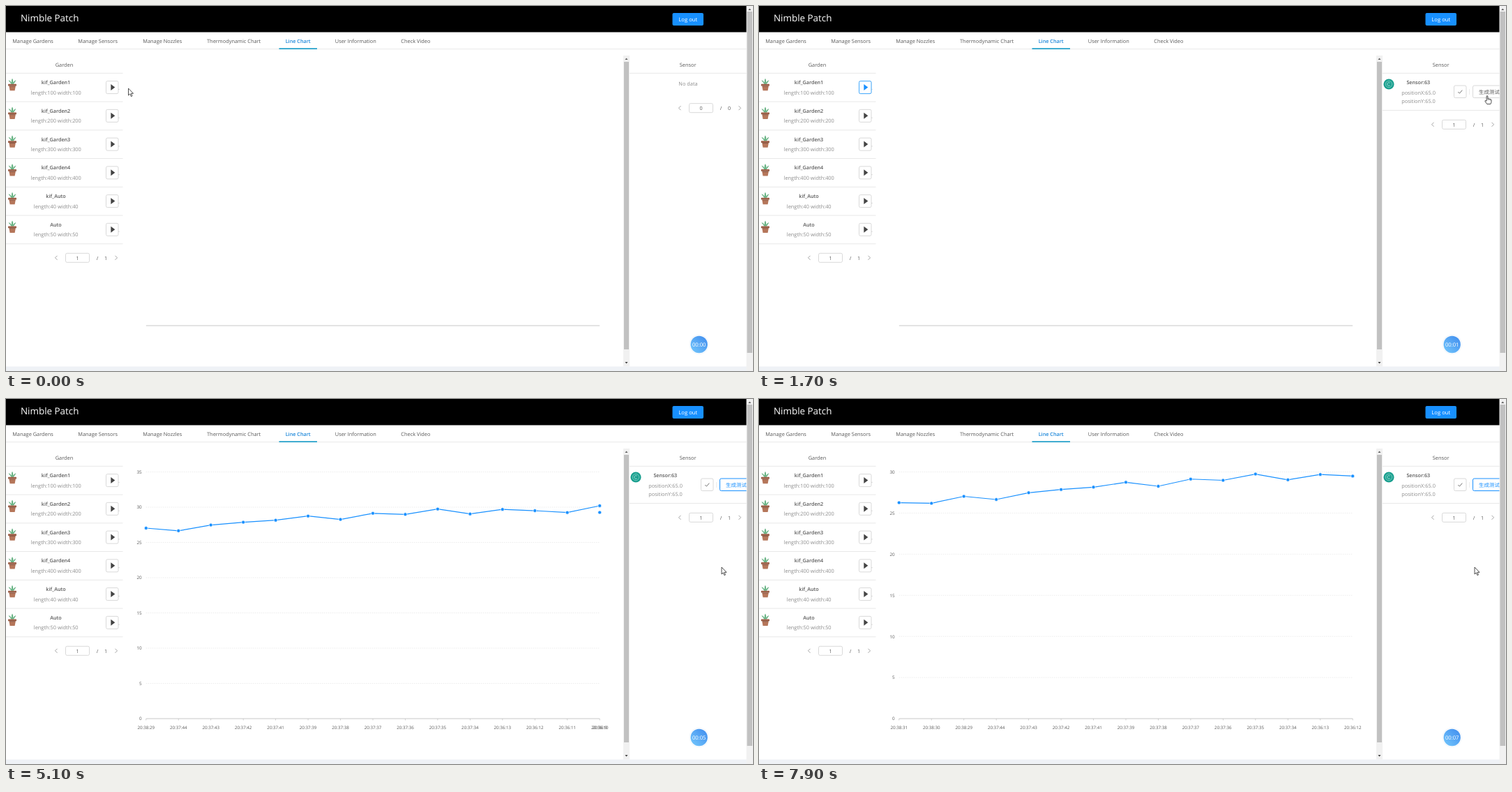
Animation, 1071 px wide and 523 px high, one loop 8000 ms. Source, as an HTML page:

```html
<!DOCTYPE html>
<html lang="en">
<head>
<meta charset="utf-8">
<title>Garden dashboard</title>
<style>
  html, body { margin: 0; width: 100%; height: 100%; overflow: hidden; background: #fff; }
  svg { display: block; }
  text { font-family: "Open Sans", "Noto Sans", "Noto Sans CJK SC", "Noto Sans CJK", sans-serif; text-rendering: geometricPrecision; }
</style>
</head>
<body>
<svg width="1071" height="523" viewBox="0 0 1071 523">
  <defs>
    <linearGradient id="badge" x1="0" y1="1" x2="1" y2="0">
      <stop offset="0" stop-color="#74c8fc"/><stop offset="1" stop-color="#3f8bee"/>
    </linearGradient>
    <clipPath id="reveal"><rect id="revealBox" x="195" y="95" width="0" height="370"/></clipPath>
  </defs>
  <g id="page"></g>
  <g id="live"></g>
  <g id="frame"></g>
  <g id="cursor"></g>
</svg>
<script>
const LOOP = 8000;
const BLUE = '#1890ff', GREY = '#d9d9d9', INK = '#595959', SOFT = '#8c8c8c';
const $ = id => document.getElementById(id);
const mix = (a, b, p) => a + (b - a) * p;
const clamp = p => Math.max(0, Math.min(1, p));
const ease = p => (p = clamp(p)) < .5 ? 2 * p * p : 1 - 2 * (1 - p) * (1 - p);

// Drawing helpers
const text = (x, y, str, size = 7.4, fill = INK, anchor = 'middle', weight = 400, opacity = 1) =>
  `<text x="${x}" y="${y}" font-size="${size}" fill="${fill}" text-anchor="${anchor}" font-weight="${weight}" opacity="${opacity}">${str}</text>`;
const rect = (x, y, w, h, fill, extra = '') =>
  `<rect x="${x}" y="${y}" width="${w}" height="${h}" fill="${fill}" ${extra}/>`;
const box = (x, y, w, h, stroke = GREY) => rect(x, y, w, h, '#fff', `rx="2" stroke="${stroke}"`);
const path = (d, fill = 'none', stroke = 'none', width = 1, extra = '') =>
  `<path d="${d}" fill="${fill}" stroke="${stroke}" stroke-width="${width}" ${extra}/>`;
const rule = (x, y, w, color = '#e8e8e8') => rect(x, y - .5, w, 1, color);
const group = (x, y, body) => `<g transform="translate(${x} ${y})">${body}</g>`;

const plant = path('M4.6 8C3 5 1.2 4 .8 2.5Q3.5 3 5 6Q4.8 2 6.2 0Q7.8 2 7.5 6Q9 3 11.6 2.5Q10.5 5 8 8Z', '#5aa878')
  + path('M6.2 1V8M2.5 4L5 8M10 4L7.4 8', 'none', '#8fd0a5', .6)
  + path('M1.6 11H11L9.8 17.5H2.8Z', '#b5765a') + rect(.2, 8, 12, 2.8, '#9c6048', 'rx=".6"')
  + rect(2, 10.8, 8.6, .8, '#7d4a38');

const playButton = (y, border = GREY, fill = '#444') =>
  box(143.5, y - 9, 17.5, 18, border) + path(`M150.3 ${y - 4.5}L156.3 ${y}L150.3 ${y + 4.5}Z`, fill);

const pager = (x, y, page) => group(x, y,
  path('M3.5 -3L.5 0L3.5 3M86.5 -3L89.5 0L86.5 3', 'none', SOFT, .8)
  + box(15.5, -6.5, 34, 13) + text(32.5, 2.8, page, 7.2)
  + text(61, 2.8, '/', 7.2) + text(73, 2.8, page, 7.2));

const scrollbar = (x, y, w, h, thumbTop, thumbH) => {
  const c = x + w / 2;
  return rect(x, y, w, h, '#f1f1f1') + rect(x + 1, thumbTop, w - 2, thumbH, '#c1c1c1')
    + path(`M${c - 2} ${y + 6}h4l-2 -2.5Z`, '#606060');
};

// Fixed parts of the page
const tabs = [[38.5, 'Manage Gardens'], [131.7, 'Manage Sensors'], [224.2, 'Manage Nozzles'],
  [326.6, 'Thermodynamic Chart'], [501.3, 'User Information'], [587.4, 'Check Video']];
const gardens = [['kif_Garden1', 100], ['kif_Garden2', 200], ['kif_Garden3', 300],
  ['kif_Garden4', 400], ['kif_Auto', 40], ['Auto', 50]];
const rowY = i => 96.3 + 40.75 * i;

$('page').innerHTML = rect(0, 0, 1071, 523, '#fff') + rect(0, 0, 1062, 37.5, '#000')
  + text(21, 21.5, 'Nimble Patch', 13.4, '#fff', 'start')
  + rect(955.5, 10, 44.5, 18, BLUE, 'rx="2"') + text(977.8, 21.8, 'Log out', 7.7, '#fff')
  + rule(0, 61.7, 1062) + rect(391.5, 60.4, 54.5, 1.6, '#1399c6')
  + tabs.map(([x, label]) => text(x, 52.9, label)).join('')
  + text(418.7, 52.9, 'Line Chart', 7.25, '#1a86d9', 'middle', 600)
  + text(83.5, 86.6, 'Garden') + text(977.7, 86.6, 'Sensor')
  + rule(0, 96.3, 167.5) + rule(894, 96.3, 168)
  + gardens.map(([name, size], i) => {
      const y = rowY(i);
      return group(2.8, y + 7.5, plant)
        + text(71.5, y + 15.8, name, 7.2, INK, 'middle', 600)
        + text(71.7, y + 30.4, `length:${size} width:${size}`, 7.4, SOFT)
        + playButton(y + 20.3) + rect(161.4, y + 22.6, 1, 1, '#bbb') + rule(0, y + 40.75, 167.5);
    }).join('')
  + pager(70, 360.8, 1)
  + rule(200.8, 458, 650.4, '#c8c8c8');

$('frame').innerHTML = scrollbar(885, 71, 9, 445.5, 80, 412) + path('M887.5 510h4l-2 2.5Z', '#404040')
  + rect(0, 516.5, 1062, 6.5, '#eff2f6') + scrollbar(1061.5, 0, 9.5, 523, 8, 489);

// Chart: readings from newest to oldest
const readings = [['38:31', 26.26], ['38:30', 26.19], ['38:29', 27.03], ['37:44', 26.65], ['37:43', 27.47],
  ['37:42', 27.86], ['37:41', 28.15], ['37:39', 28.74], ['37:38', 28.26], ['37:37', 29.13], ['37:36', 28.98],
  ['37:35', 29.74], ['37:34', 29.04], ['36:13', 29.69], ['36:12', 29.5], ['36:11', 29.24], ['36:10', 30.2], ['36:9', 29.25]];
const SHOWN = 15, CHART_START = 2050, MORPH = 450;
const updates = [4550, 5550, 6550], CLEANUP = 7500;
const scaleMax = [35, 35, 30, 30];
const xAt = i => 200.8 + 46.457 * i;
const yAt = (v, max) => 458 - v * 353.5 / max;

const dot = (x, y, p = 1) => `<circle cx="${x}" cy="${y}" r="${2.5 * p}" fill="${BLUE}" stroke="#fff" stroke-width=".7"/>`;
const timeLabel = (x, j, opacity = 1) => text(x, 472.6, '20:' + readings[j][0], 6.2, INK, 'middle', 400, opacity);
const valueLabel = (y, v) => text(194.6, y + 2.4, v, 6.3, INK, 'end');

function chart(t) {
  const k = updates.filter(u => u <= t).length;
  const start = 3 - k, before = k ? start + 1 : start;
  const max = scaleMax[k], maxBefore = scaleMax[Math.max(0, k - 1)];
  const p = k ? ease((t - updates[k - 1]) / MORPH) : 1;
  const shown = ease((t - CHART_START) / MORPH);
  const y = v => mix(yAt(v, maxBefore), yAt(v, max), p);
  $('revealBox').setAttribute('width', 665 * shown);

  let grid = '', labels = '', dots = '', line = '';
  for (let v = 0; v <= max; v += 5) {
    if (v) grid += path(`M200.8 ${y(v)}H851.2`, 'none', '#e8e8e8', .8, 'stroke-dasharray="1.5 1.5"');
    labels += valueLabel(y(v), v);
  }
  for (let i = 0; i < SHOWN; i++) {
    const j = start + i, entering = j < before;
    const x = mix(xAt(Math.max(0, j - before)), xAt(i), p);
    const from = yAt(readings[before + i][1], maxBefore), to = yAt(readings[j][1], max);
    grid += rect(xAt(i) - .4, 458, .8, 2.5, '#c8c8c8');
    line += `${i ? 'L' : 'M'}${xAt(i)} ${mix(from, to, p)}`;
    labels += timeLabel(x, j, entering ? p : 1);
    dots += dot(x, y(readings[j][1]), entering ? p : shown);
  }
  // Items that left the window linger until the next refresh
  if (k && t < CLEANUP) {
    const gone = before + SHOWN - 1;
    labels += timeLabel(xAt(SHOWN - 1), gone);
    dots += dot(xAt(SHOWN - 1), yAt(readings[gone][1], maxBefore));
    if (max < maxBefore) labels += valueLabel(yAt(maxBefore, maxBefore), maxBefore);
  }
  return grid + labels + `<g clip-path="url(#reveal)">${path(line, 'none', BLUE, 1.2)}</g>` + dots;
}

const SENSOR_AT = 950, CHECK_AT = 1950, TEST_AT = 2900;

function sensorPanel(t) {
  if (t < SENSOR_AT) return text(978, 114.4, 'No data', 7.4, SOFT) + pager(964, 146.2, 0);
  const testColor = t >= TEST_AT ? BLUE : null;
  const checkColor = t >= CHECK_AT && t < TEST_AT ? BLUE : null;
  return `<circle cx="903" cy="112" r="7.6" fill="#1a9f8f"/><circle cx="903" cy="112" r="4.7" fill="none" stroke="#8fd6c9" stroke-width=".8"/>`
    + path('M904.8 110.5A2.3 2.3 0 1 0 904.8 113.5', 'none', '#a9e2d8', .9)
    + text(945.3, 112.1, 'Sensor:63', 7.2, INK, 'middle', 600)
    + text(945.5, 126.7, 'positionX:65.0', 7.4, SOFT) + text(945.5, 138.7, 'positionY:65.0', 7.4, SOFT)
    + box(996.5, 114, 17.5, 17.5, checkColor || GREY)
    + path('M1002.3 123L1004.4 125.2L1008.3 120.6', 'none', checkColor || '#666', .9)
    + rect(1018, 119, .8, 8, '#e8e8e8')
    + box(1023.5, 114, 62, 17.5, testColor || GREY)
    + text(1032, 126, '生成测试数据', 7.5, testColor || INK, 'start')
    + rule(894, 149.5, 168) + pager(964, 169.8, 1);
}

function timer(t) {
  return `<circle cx="993.7" cy="485" r="14" fill="#eef4fa"/><circle cx="993.7" cy="485" r="13.2" fill="#fff"/>`
    + `<circle cx="993.7" cy="485" r="12.2" fill="url(#badge)"/>`
    + text(993.7, 487.8, `00:0${Math.floor(t / 1000)}`, 7.7, '#fff');
}

// Pointer: time, x, y of the tip
const route = [[0, 175.5, 118], [150, 175.5, 118], [600, 156.5, 112.5], [850, 156.5, 112.5], [1500, 1044, 128.5],
  [1700, 1044, 128.5], [1900, 1005, 121], [2150, 1005, 121], [2500, 1023, 120.5], [2700, 1040, 121],
  [2950, 1040, 121], [3500, 1028, 219], [3700, 1027.5, 221], [3800, 1027, 230.5], [4400, 1026.5, 237],
  [4700, 1026, 241], [LOOP, 1026, 241]];
const arrow = path('M0 0V10L2.3 7.9L3.9 11.6L5.5 10.9L3.9 7.3H7Z', '#fff', '#222', .8);
const hand = path('M-.9 .6Q0 -.5 .9 .6V4.3Q2 3.6 2.7 4.7Q3.9 4.1 4.4 5.2Q5.8 4.9 6 6.2V8.7Q5.8 10.5 4.9 12H-.3Q-1.8 9.8 -3.3 7.6Q-3.2 6.2 -.9 7.7Z', '#fff', '#222', .8)
  + path('M.9 4.3V6.3M2.7 4.7V6.5M4.4 5.2V6.8', 'none', '#222', .6);

function pointer(t) {
  const n = route.findIndex(([time]) => time > t);
  const [t0, x0, y0] = route[n - 1], [t1, x1, y1] = route[n];
  const p = ease((t - t0) / (t1 - t0));
  const isHand = (t > 480 && t < 920) || (t > 1420 && t < 3080);
  return group(mix(x0, x1, p), mix(y0, y1, p), isHand ? hand : arrow);
}

function draw(now) {
  const t = now % LOOP;
  const pressed = t >= 600 && t < 900;
  const focused = t >= 480 && t < CHECK_AT;
  $('live').innerHTML = (focused ? playButton(rowY(0) + 20.3, pressed ? '#096dd9' : '#40a9ff', pressed ? '#096dd9' : BLUE) : '')
    + (t >= CHART_START ? chart(t) : '') + sensorPanel(t) + timer(t);
  $('cursor').innerHTML = pointer(t);
}

const origin = performance.now();
function tick() {
  draw(performance.now() - origin);
  requestAnimationFrame(tick);
}
tick();
</script>
</body>
</html>
```
